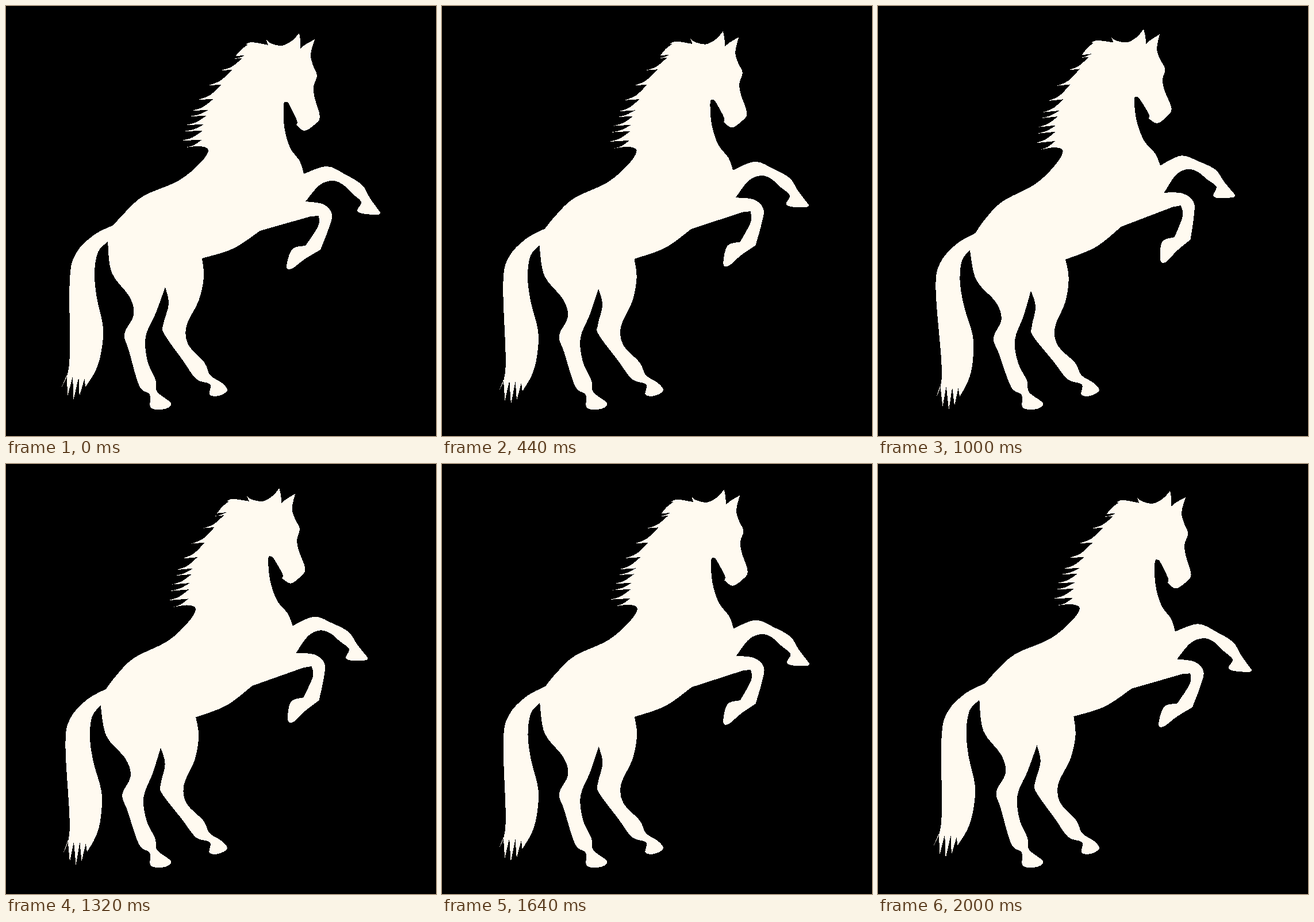
Write an HTML page that moves like this. It is 748 by 748 pixels and loops after 2040 ms.

```html
<!DOCTYPE html>
<html lang="en">
<head>
<meta charset="utf-8">
<title>Rearing horse</title>
<style>
  html, body { margin: 0; width: 100%; height: 100%; overflow: hidden; background: #000; }
  svg { display: block; width: 100%; height: 100%; }
</style>
</head>
<body>
<svg viewBox="0 0 748 748"><path id="horse" fill="#fffaf0" shape-rendering="crispEdges"/></svg>
<script>
const STEP = 40, STEPS = 51, PEAK = 25;
const GROUND = 690, PIVOT = 365;

// Each motion gives how far a point moves by the top of the swing.
function bend(x, y) {
  const h = Math.max(0, GROUND - y), u = h / 330;
  const lift = 0.09 * u * Math.exp((1 - u * u) / 2) * (1 + (x - PIVOT) / 1500);
  return [-0.09 * h * h / (h + 130), lift * (PIVOT - x)];
}
function reach(x, y) {
  const [dx, dy] = bend(x, y);
  return [dx - 0.065 * (x - 518), dy];
}
function unfold(x, y) {
  const [dx, dy] = bend(x, y);
  return [dx + 0.15 * (y - 340), dy];
}
const swish = (x, y) => [0.078 * (y - 610), 0.05 * (470 - x)];

// Key points, clockwise from the ear; "/" ends a smooth run at a corner.
const head = `510,47 / 512,60 512,74 / 521,67 537,58 /
  530,84 534,103 541,121 535,140 537,160 546,193 536,207 519,217 505,207 /
  506,199 493,172 488,167 483,172 484,210 494,246 511,270 518,292`;
const farForeleg = `558,279 590,293 619,311 633,334 651,359 / 647,363 620,361 611,355
  618,341 602,326 585,310 567,304 545,312 521,340`;
const nearForeleg = `552,345 567,362 561,388 547,424 / 520,440 497,457 488,453 498,423 521,417 /
  543,383 544,365 / 530,366`;
const hindLegs = `442,391 / 395,422 341,439 / 344,472 335,513 314,556 317,589 345,620 355,642
  376,656 385,669 370,678 354,676 355,658 331,649 308,617 275,570 274,552 283,518 277,489 /
  261,533 243,575 246,617 260,650 263,671 287,691 276,701 252,699 250,676 232,661
  214,600 206,570 222,538 215,506 184,464 177,410`;
const tailInside = `160,428 154,465 158,508 169,560 165,605 155,636`;
const tailOutside = `107,640 111,600 111,475 122,430 152,399 187,381`;
const back = `208,358 240,330 300,304 338,273 352,251 338,244 313,246`;
const crest = `409,76 421,67 / 417,67 / 428,63 456,68 / 453,59 / 461,65 480,69 498,60 510,47`;

const parse = text => text.split("/")
  .map(run => run.trim().split(/\s+/).map(pair => pair.split(",").map(Number)));

// Pointed tail hairs, longest in the middle.
function tailHairs() {
  const runs = [];
  for (let i = 0; i < 5; i++) {
    const x = 138 - 10.3 * i;
    if (i) runs.push([[x + 9, 650 - 2 * i]]);
    runs.push([[x, 663 + 22 * Math.sin(Math.PI * i / 4)]]);
  }
  return runs;
}

// Locks hang from a curved neckline and shorten towards the crest.
function maneLocks() {
  let tip = [313, 246];
  return [233, 217, 206, 191, 181, 162, 137, 111, 91, 86].flatMap(y => {
    const t = (244 - y) / 177;
    const root = [340 + 95 * t * t, y];
    const mid = [(tip[0] + root[0]) / 2, (tip[1] + y) / 2 + 0.2 * (tip[1] - y)];
    tip = [root[0] - 36 + 22 * t, y + 1];
    return [[mid, root], [tip]];
  });
}

const parts = [
  [bend, parse(head)],
  [reach, parse(farForeleg)],
  [unfold, parse(nearForeleg)],
  [bend, parse(hindLegs)],
  [swish, [...parse(tailInside + " 138,663"), ...tailHairs().slice(1), ...parse(tailOutside)]],
  [bend, [...parse(back), ...maneLocks(), ...parse(crest)]]
];
const runs = parts.flatMap(([motion, list]) =>
  list.map(run => run.map(([x, y]) => [x, y, ...motion(x, y)])));

// Catmull-Rom spline through each run, sharp where runs meet.
function outline(k) {
  const posed = runs.map(run => run.map(([x, y, dx, dy]) => [x + k * dx, y + k * dy]));
  let last = posed[0][0], d = "M" + last;
  for (const run of posed.slice(1)) {
    const pts = [last, ...run];
    for (let i = 0; i + 1 < pts.length; i++) {
      const a = pts[i], b = pts[i + 1];
      const before = pts[i - 1] || a, after = pts[i + 2] || b;
      const c1 = a.map((v, j) => v + (b[j] - before[j]) / 6);
      const c2 = b.map((v, j) => v - (after[j] - a[j]) / 6);
      d += `C${c1} ${c2} ${b}`;
    }
    last = pts[pts.length - 1];
  }
  return d + "Z";
}

const horse = document.getElementById("horse");
const start = performance.now();
function draw() {
  const i = Math.floor(Math.max(0, performance.now() - start) / STEP) % STEPS;
  horse.setAttribute("d", outline(Math.min(i, STEPS - i) / PEAK));
  requestAnimationFrame(draw);
}
draw();
</script>
</body>
</html>
```
